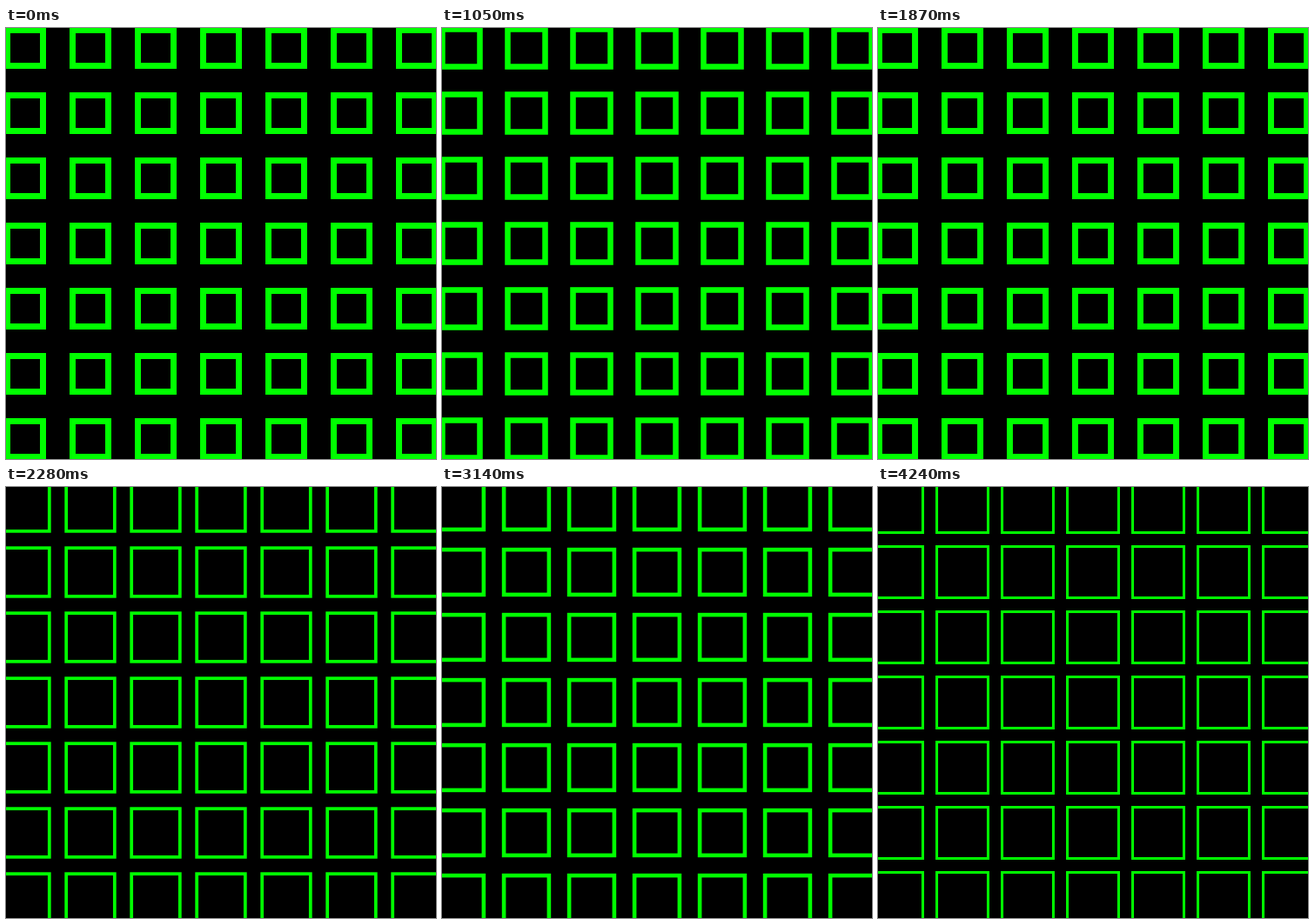
An HTML page with a canvas for the animation above (4390 ms loop, 494 by 496 pixels).

```html
<!DOCTYPE html>
<html lang="en">
<head>
<meta charset="utf-8">
<title>Pulsing squares</title>
<style>
  html, body { margin: 0; width: 100%; height: 100%; overflow: hidden; background: #000; }
  canvas { display: block; }
</style>
</head>
<body>
<canvas id="stage" width="494" height="496"></canvas>
<script>
const ctx = document.getElementById("stage").getContext("2d");
const LOOP = 4390;
const STEP = 58.1;      // ms per pose
const LEAD = 6;         // ms by which poses run ahead of the clock
const LAST = 73;        // the final pose stays until the loop cuts back
const PERIOD = 16.4;    // poses per pulse
const PEAK = 24.65;     // a pose position where the squares are largest
const PITCH = 75;

const clamp = (v, lo, hi) => Math.min(hi, Math.max(lo, v));

// 1 at the largest size, 0 at the smallest, resting briefly at both
function pulse(pose) {
  const phase = (((pose - PEAK) / PERIOD) % 1 + 1) % 1;
  const wave = Math.abs(1 - 2 * phase);
  return clamp(0.5 + 1.25 * (wave - 0.5), 0, 1);
}

function draw(t) {
  const pose = Math.min(LAST, Math.floor((t + LEAD) / STEP));
  const u = pulse(pose);
  const line = 7 - 4 * u;
  const side = 48 + 14 * u - line;

  ctx.fillStyle = "#000";
  ctx.fillRect(0, 0, 494, 496);
  ctx.strokeStyle = "#0f0";
  ctx.lineWidth = line;
  for (let row = 0; row < 7; row++) {
    for (let col = 0; col < 7; col++) {
      const x = 22 + col * PITCH, y = 23 + row * PITCH;
      ctx.strokeRect(x - side / 2, y - side / 2, side, side);
    }
  }
}

const start = performance.now();
function tick() {
  draw((performance.now() - start) % LOOP);
  requestAnimationFrame(tick);
}
tick();
</script>
</body>
</html>
```
